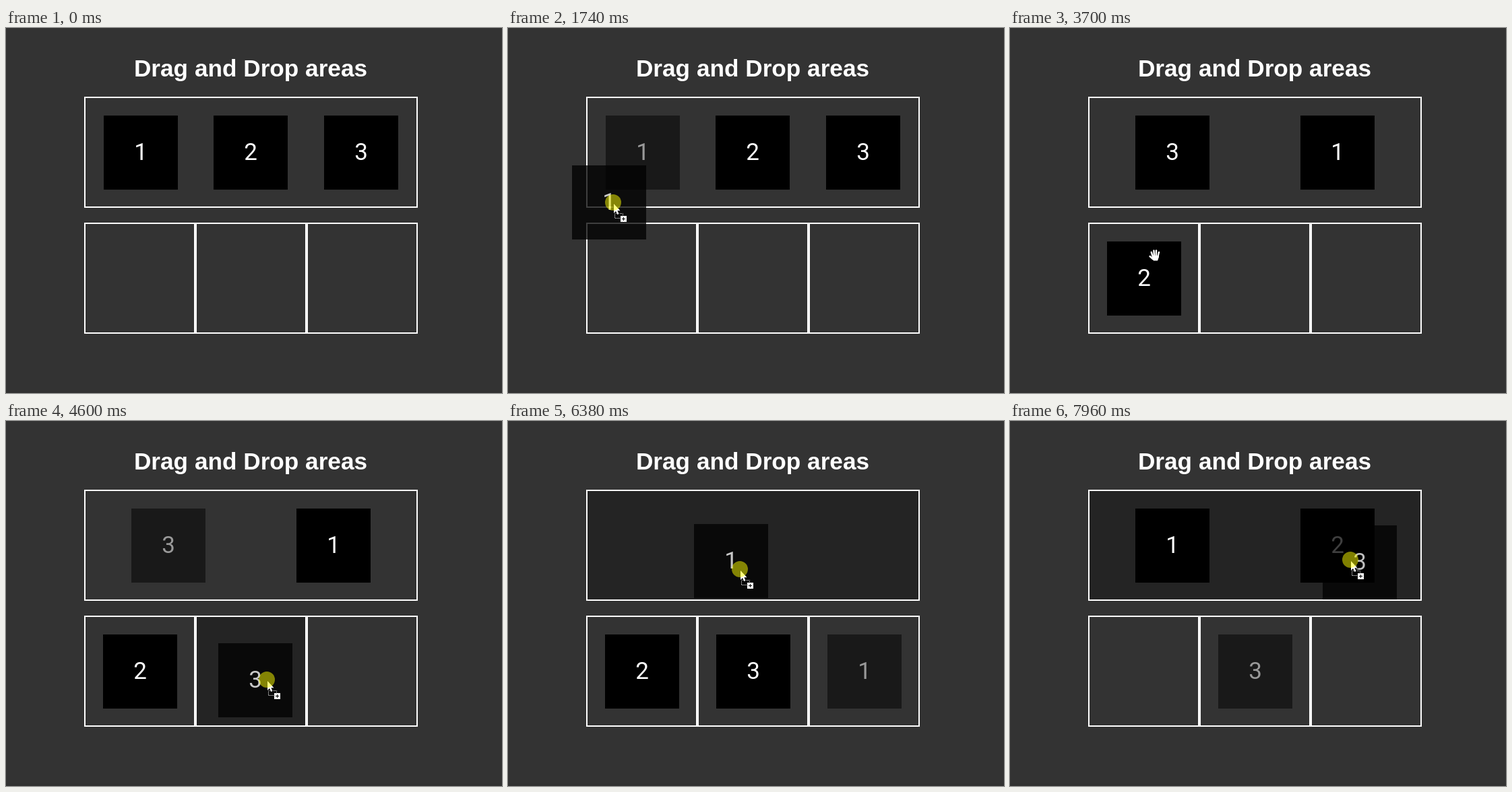
Write an HTML page with a canvas that moves like this. It is 736 px wide and 542 px high and loops after 8000 ms.

```html
<!DOCTYPE html>
<html lang="en">
<head>
<meta charset="utf-8">
<title>Drag and Drop areas</title>
<style>
  html, body { margin: 0; width: 100%; height: 100%; overflow: hidden; background: #333; }
  canvas { display: block; }
</style>
</head>
<body>
<canvas id="stage" width="736" height="542"></canvas>
<script>
const ctx = document.getElementById('stage').getContext('2d');
const LOOP = 8000, START = 130, TICK = 68.5;
const SIZE = 110, AREA = 165, BORDER = 2, LEFT = 116;
const PRESS_LEAD = 2;

const zones = [{ x: LEFT, y: 102, w: 3 * AREA, h: AREA }];
for (let i = 0; i < 3; i++) zones.push({ x: LEFT + i * AREA, y: 289, w: AREA, h: AREA });

// Each drag lifts a box at one point and leads it along a path into a zone
const entry = [649, 488];
const drags = [
  { id: 1, to: 0, lift: 11, drop: 32, from: [206, 185],
    path: [[282, 140], [120, 180], [156, 259], [185, 363], [212, 190]] },
  { id: 2, to: 1, lift: 41, drop: 51, from: [210, 162], path: [[212, 347]] },
  { id: 3, to: 2, lift: 60, drop: 66, from: [258, 184], path: [[387, 384]] },
  { id: 1, to: 3, lift: 74, drop: 80, from: [377, 194], path: [[542, 384]] },
  { id: 1, to: 0, lift: 85, drop: 93, from: [542, 384], path: [[332, 210]] },
  { id: 2, to: 0, lift: 99, drop: 105, from: [208, 371], path: [[399, 221]] },
  { id: 3, to: 0, lift: 110, drop: 115, from: [350, 368], path: [[505, 206]] }
];

// Smooth curve through evenly timed points, at rest at both ends
function along(points, progress) {
  const last = points.length - 1;
  const s = Math.max(0, Math.min(1, progress)) * last;
  const i = Math.min(last - 1, Math.floor(s)), u = s - i, v = 1 - u;
  const slope = (k, axis) => k > 0 && k < last ? (points[k + 1][axis] - points[k - 1][axis]) / 2 : 0;
  const [x, y] = [0, 1].map(axis => Math.round(
    points[i][axis] * (1 + 2 * u) * v * v + points[i + 1][axis] * u * u * (3 - 2 * u) +
    u * v * (v * slope(i, axis) - u * slope(i + 1, axis))));
  return { x, y };
}

function pointerAt(tick) {
  let rest = entry, since = 0;
  for (const { lift, drop, from, path } of drags) {
    if (tick < lift) return along([rest, from], (tick - since) / (lift - PRESS_LEAD - since));
    if (tick < drop) return along([from, ...path], (tick - lift) / (drop - 1 - lift));
    rest = path[path.length - 1];
    since = drop;
  }
  return along([rest, rest], 1);
}

// Boxes share the free width evenly; gaps round down to 1/64 px as in browser layout
function boxesAt(tick) {
  const held = [[1, 2, 3], [], [], []];
  for (const { id, drop, to } of drags) {
    if (drop > tick) break;
    const from = held.find(ids => ids.includes(id));
    from.splice(from.indexOf(id), 1);
    held[to].push(id);
  }
  return held.flatMap((ids, zone) => {
    const { x, y, w, h } = zones[zone], n = ids.length;
    const gap = Math.floor((w - 2 * BORDER - n * SIZE) / (2 * n) * 64) / 64;
    return ids.map((id, i) => ({
      id, zone,
      x: Math.round(x + BORDER + gap * (2 * i + 1) + SIZE * i),
      y: Math.round(y + (h - SIZE) / 2)
    }));
  });
}

const inside = (p, { x, y, w = SIZE, h = SIZE }) => p.x >= x && p.x < x + w && p.y >= y && p.y < y + h;
const zoneUnder = p => zones.findIndex(z => inside(p, z));
const boxUnder = (p, boxes) => boxes.find(b => inside(p, b));

function targetAt(tick) {
  const p = pointerAt(tick), box = boxUnder(p, boxesAt(tick));
  return box ? 'box' + box.id : zoneUnder(p);
}

function makeTile(label) {
  const tile = document.createElement('canvas');
  tile.width = tile.height = SIZE;
  const c = tile.getContext('2d');
  c.fillRect(0, 0, SIZE, SIZE);
  c.fillStyle = '#fff';
  c.font = '35px Roboto, Arial, sans-serif';
  c.textAlign = 'center';
  c.fillText(label, SIZE / 2, 66);
  return tile;
}
const tiles = [0, 1, 2, 3].map(makeTile);

function drawBox(id, x, y, alpha) {
  ctx.globalAlpha = alpha;
  ctx.drawImage(tiles[id], x, y);
  ctx.globalAlpha = 1;
}

function strokeShape(shape, color, width) {
  ctx.strokeStyle = color;
  ctx.lineWidth = width;
  ctx.stroke(shape);
}

const arrow = new Path2D('M1 2V16L4 13L6.3 18L8.6 17L6.4 12.3H10.6Z');
const fingers = new Path2D('M-5.2-5L-3 2M-1.6-7.6L-1 1M2-7.6L1.7 1M6-5L4.2 2M-7.4 1L-3 5');
const palm = new Path2D('M-4 1.5L-4.5 4L-2 7.5H4L6 2V0L-2 0Z');
const ban = new Path2D('M8.5 0A8.5 8.5 0 1 1-8.5 0A8.5 8.5 0 1 1 8.5 0M-6-6L6 6');
const parcel = new Path2D('M2.5 16.5H14.5V23.5H2.5Z');

const cursors = {
  arrow() {
    strokeShape(arrow, '#000', 1.6);
    ctx.fillStyle = '#fff';
    ctx.fill(arrow);
  },
  hand() {
    ctx.lineCap = 'round';
    strokeShape(fingers, '#000', 4.3);
    strokeShape(fingers, '#fff', 2.5);
    ctx.fillStyle = '#fff';
    ctx.fill(palm);
  },
  ban() {
    strokeShape(ban, '#fff', 4.6);
    strokeShape(ban, '#000', 2);
  },
  copy() {
    strokeShape(parcel, '#000', 1);
    ctx.setLineDash([1, 1]);
    ctx.lineDashOffset = 0.5;
    strokeShape(parcel, '#fff', 1);
    ctx.setLineDash([]);
    cursors.arrow();
    ctx.fillStyle = '#fff';
    ctx.fillRect(11, 20, 9, 9);
    ctx.fillStyle = '#000';
    ctx.fillRect(13, 24, 5, 1);
    ctx.fillRect(15, 22, 1, 5);
  }
};

function drawPointer(p, kind, pressed) {
  ctx.save();
  ctx.translate(p.x, p.y);
  cursors[kind]();
  if (pressed) {
    ctx.fillStyle = 'rgba(255,255,0,.5)';
    ctx.beginPath();
    ctx.arc(0, 0, 12, 0, 2 * Math.PI);
    ctx.fill();
  }
  ctx.restore();
}

function drawZone({ x, y, w, h }, lit) {
  if (lit) {
    ctx.fillStyle = 'rgba(0,0,0,.3)';
    ctx.fillRect(x, y, w, h);
  }
  ctx.strokeStyle = '#fff';
  ctx.lineWidth = BORDER;
  ctx.strokeRect(x + BORDER / 2, y + BORDER / 2, w - BORDER, h - BORDER);
}

function draw(tick) {
  const p = pointerAt(tick), boxes = boxesAt(tick);
  const drag = drags.find(d => tick >= d.lift - PRESS_LEAD && tick < d.drop);
  const lifted = drag && tick >= drag.lift;
  const source = lifted && boxes.find(b => b.id === drag.id);
  const over = lifted ? zoneUnder(p) : -1;

  ctx.fillStyle = '#333';
  ctx.fillRect(0, 0, 736, 542);
  ctx.fillStyle = '#313131';
  ctx.fillRect(0, 538, 736, 4);

  ctx.textAlign = 'center';
  ctx.fillStyle = '#fff';
  ctx.font = 'bold 35.2px "Liberation Sans", Arial, sans-serif';
  ctx.fillText('Drag and Drop areas', 363, 72);

  zones.forEach((zone, i) => drawZone(zone, i === over && i !== source.zone));
  for (const b of boxes) drawBox(b.id, b.x, b.y, b === source ? 0.5 : 1);

  let kind = boxUnder(p, boxes) ? 'hand' : 'arrow';
  if (lifted) {
    const [grabX, grabY] = drag.from;
    drawBox(drag.id, source.x + p.x - grabX, source.y + p.y - grabY, 0.75);
    // The drop is refused for a moment on entering a new target
    const entering = tick === drag.lift || targetAt(tick) !== targetAt(tick - 1);
    kind = entering ? 'ban' : 'copy';
  }
  if (tick >= 0) drawPointer(p, kind, drag);
}

function frame() {
  const t = performance.now() % LOOP;
  draw(Math.floor((t - START) / TICK + 0.02));
  requestAnimationFrame(frame);
}
frame();
</script>
</body>
</html>
```
